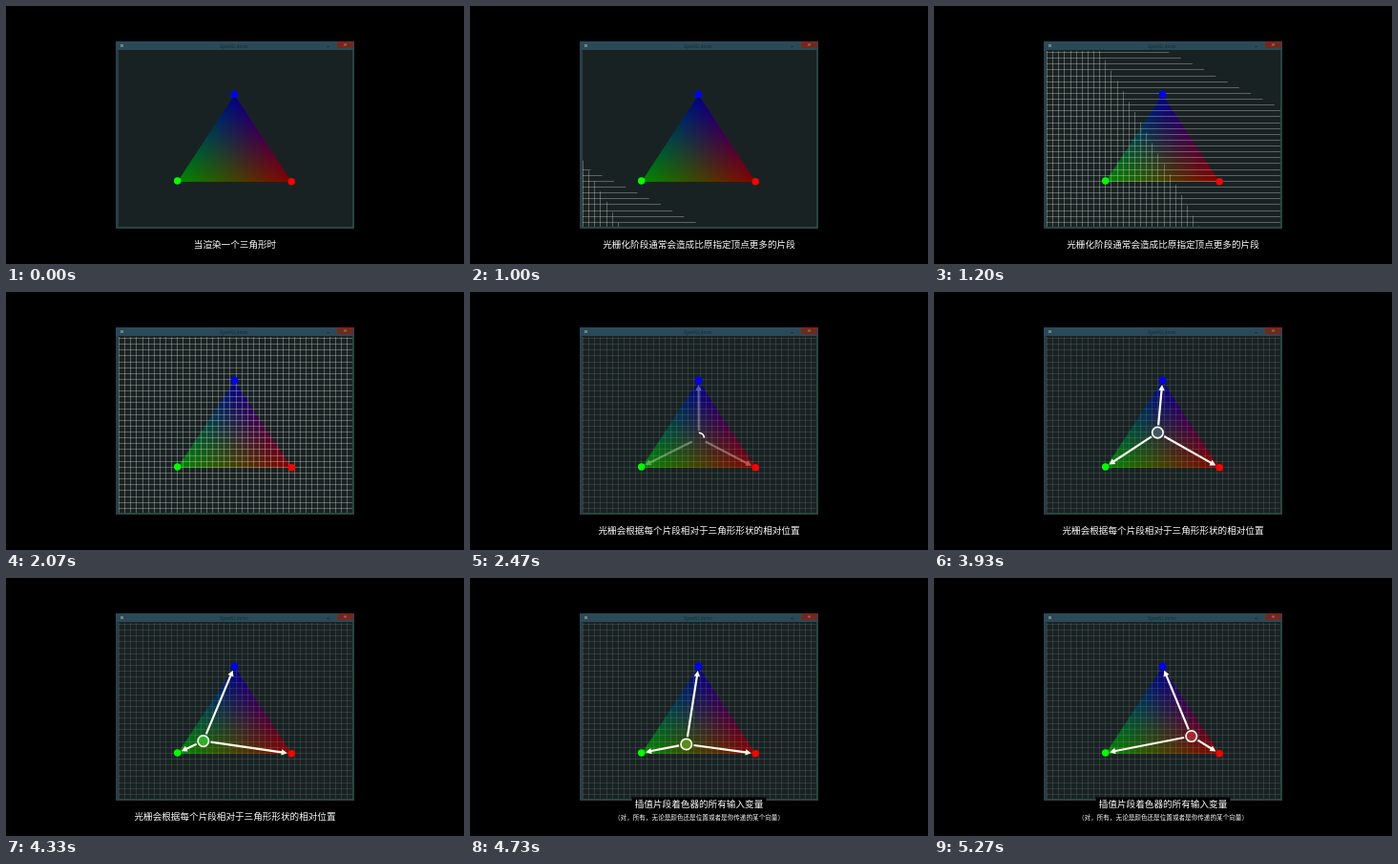
An HTML page with a canvas for the animation above (5340 ms loop, 480x270 px).

```html
<!DOCTYPE html>
<html lang="zh">
<head>
<meta charset="utf-8">
<title>光栅化</title>
<style>
  html, body { margin: 0; width: 100%; height: 100%; overflow: hidden; background: #000; }
  canvas { display: block; width: 480px; height: 270px; }
</style>
</head>
<body>
<canvas id="stage" width="480" height="270"></canvas>
<script>
const ctx = document.getElementById('stage').getContext('2d');
const LOOP = 5340, TICK = 200 / 3;
const FONT = '"Noto Sans CJK SC", "Noto Sans CJK", sans-serif';
const INK = '#fffdf0';
const TOP = { x: 239.5, y: 92.5 }, LEFT = { x: 179.7, y: 183 }, RIGHT = { x: 299.2, y: 183.8 };

// The probe leaves the centroid and visits the blue, green and red corners.
const path = [
  { t: 2700, x: 239.8, y: 153 },
  { t: 3330, x: 239.5, y: 117 },
  { t: 3930, x: 234.5, y: 147 },
  { t: 4370, x: 206, y: 172 },
  { t: 4730, x: 226.5, y: 174 },
  { t: 5270, x: 270, y: 165.5 }
];

// [start, end, lines of [text, size, centre y]]
const captions = [
  [0, 330, [['当渲染一个三角形时', 9.6, 249.2]]],
  [390, 2060, [['光栅化阶段通常会造成比原指定顶点更多的片段', 9.6, 249.2]]],
  [2130, 4390, [['光栅会根据每个片段相对于三角形形状的相对位置', 9.6, 249.2]]],
  [4460, LOOP, [
    ['插值片段着色器的所有输入变量', 9.65, 236.3],
    ['（对，所有，无论是颜色还是位置或者是你传递的某个向量）', 6.6, 250.5]
  ]]
];

const clamp = v => Math.min(1, Math.max(0, v));
const ramp = (t, from, to) => clamp((t - from) / (to - from));
const mix = (a, b, p) => a + (b - a) * p;

function rect(x, y, w, h, color) {
  ctx.fillStyle = color;
  ctx.fillRect(x, y, w, h);
}

function disc(p, r, color) {
  ctx.fillStyle = color;
  ctx.beginPath();
  ctx.arc(p.x, p.y, r, 0, Math.PI * 2);
  ctx.fill();
}

function setFont(size) {
  ctx.font = `500 ${size}px ${FONT}`;
  ctx.textAlign = 'center';
  ctx.textBaseline = 'middle';
}

function text(str, size, x, y, color) {
  setFont(size);
  ctx.fillStyle = color;
  ctx.fillText(str, x, y);
}

function drawWindow() {
  rect(115, 37, 250, 196, '#28463f');
  rect(115, 37, 3, 196, '#2b3e48');
  rect(115, 37, 250, 9, '#2a4a58');
  rect(347, 37, 17, 7, '#74281c');
  rect(120, 40, 3, 3, '#6d8680');
  rect(336, 42, 3, 1, '#1c3038');
  rect(354, 39.5, 3, 2, '#93604c');
  text('OpenGL demo', 4.5, 239, 42, '#182a2c');
  rect(118, 46, 245, 185, '#192223');
}

function drawTriangle() {
  const base = 184, k = 135;
  for (let y = 93; y < base; y++) {
    const p = (y + 0.5 - 93) / (base - 93);
    const x0 = mix(TOP.x, LEFT.x, p), x1 = mix(TOP.x, RIGHT.x, p);
    const shade = ctx.createLinearGradient(x0, 0, x1, 0);
    shade.addColorStop(0, `rgb(0,${k * p},${k * (1 - p)})`);
    shade.addColorStop(1, `rgb(${k * p},0,${k * (1 - p)})`);
    rect(x0, y, x1 - x0, 1, shade);
  }
}

function drawGrid(t) {
  if (t < 990) return;
  const gap = 6.13, elapsed = (t - 935) / 1000;
  const x0 = 118, x1 = 363, y0 = 47, y1 = 231;
  ctx.fillStyle = `rgba(222,224,210,${mix(0.34, 0.12, ramp(t, 2070, 2333))})`;
  for (let i = 0; i < 30; i++) {
    const grown = clamp(7.45 * elapsed - i * 0.05);
    ctx.fillRect(x0, Math.round(48 + gap * (29 - i)), (x1 - x0) * grown, 1);
  }
  for (let j = 0; j < 40; j++) {
    const grown = clamp(5.8 * elapsed - j * 0.059);
    const h = (y1 - y0) * grown;
    ctx.fillRect(Math.round(x0 + gap * j), y1 - h, 1, h);
  }
}

// Slope of one coordinate at a waypoint; the ends are at rest or run straight on.
function slope(i, axis) {
  if (i === 0) return 0;
  const a = path[i - 1], b = path[Math.min(i + 1, path.length - 1)];
  return (b[axis] - a[axis]) / (b.t - a.t);
}

function probeAt(t) {
  if (t <= path[0].t) return path[0];
  const next = path.findIndex(p => p.t >= t);
  const i = (next < 0 ? path.length - 1 : next) - 1;
  const a = path[i], b = path[i + 1], span = b.t - a.t, u = (t - a.t) / span;
  const at = axis =>
    mix(a[axis], b[axis], u * u * (3 - 2 * u)) +
    span * u * (1 - u) * ((1 - u) * slope(i, axis) - u * slope(i + 1, axis));
  return { x: at('x'), y: at('y') };
}

function colorAt(p) {
  const b = (183.5 - p.y) / 91;
  const r = (p.x - b * TOP.x - (1 - b) * LEFT.x) / (RIGHT.x - LEFT.x);
  return `rgb(${255 * r},${255 * (1 - b - r)},${255 * b})`;
}

function arrow(from, to) {
  const tip = Math.hypot(to.x - from.x, to.y - from.y) - 4.5;
  ctx.save();
  ctx.translate(from.x, from.y);
  ctx.rotate(Math.atan2(to.y - from.y, to.x - from.x));
  ctx.fillStyle = INK;
  ctx.beginPath();
  ctx.moveTo(7.8, -1.1);
  ctx.lineTo(tip - 6, -1.1);
  ctx.lineTo(tip - 6, -3.2);
  ctx.lineTo(tip, 0);
  ctx.lineTo(tip - 6, 3.2);
  ctx.lineTo(tip - 6, 1.1);
  ctx.lineTo(7.8, 1.1);
  ctx.fill();
  ctx.restore();
}

function drawProbe(t) {
  const p = probeAt(t);
  ctx.globalAlpha = ramp(t, 2333, 2733);
  [TOP, LEFT, RIGHT].forEach(v => arrow(p, v));
  ctx.globalAlpha = ramp(t, 2600, 2800);
  disc(p, 5.6, colorAt(p));
  ctx.globalAlpha = 1;
  const drawn = ramp(t, 2400, 2680);
  if (!drawn) return;
  ctx.strokeStyle = INK;
  ctx.lineWidth = 1.7;
  ctx.beginPath();
  ctx.arc(p.x, p.y, 5.7, -Math.PI / 2, -Math.PI / 2 + drawn * Math.PI * 2);
  ctx.stroke();
}

function drawCaption(t) {
  const shown = captions.find(([from, to]) => t >= from && t < to);
  if (!shown) return;
  for (const [str, size, y] of shown[2]) {
    setFont(size);
    const w = ctx.measureText(str).width + 6;
    rect(240 - w / 2, y - size / 2 - 2, w, size + 4, '#000');
    text(str, size, 240, y, '#fff');
  }
}

function draw(t) {
  rect(0, 0, 480, 270, '#000');
  drawWindow();
  drawTriangle();
  drawGrid(t);
  disc(TOP, 3.7, '#00f');
  disc(LEFT, 3.7, '#0f0');
  disc(RIGHT, 3.7, '#f00');
  drawProbe(t);
  drawCaption(t);
}

const start = performance.now();
function loop() {
  const t = (performance.now() - start) % LOOP;
  draw(Math.round(Math.floor((t + 4) / TICK) * TICK));
  requestAnimationFrame(loop);
}
loop();
</script>
</body>
</html>
```
